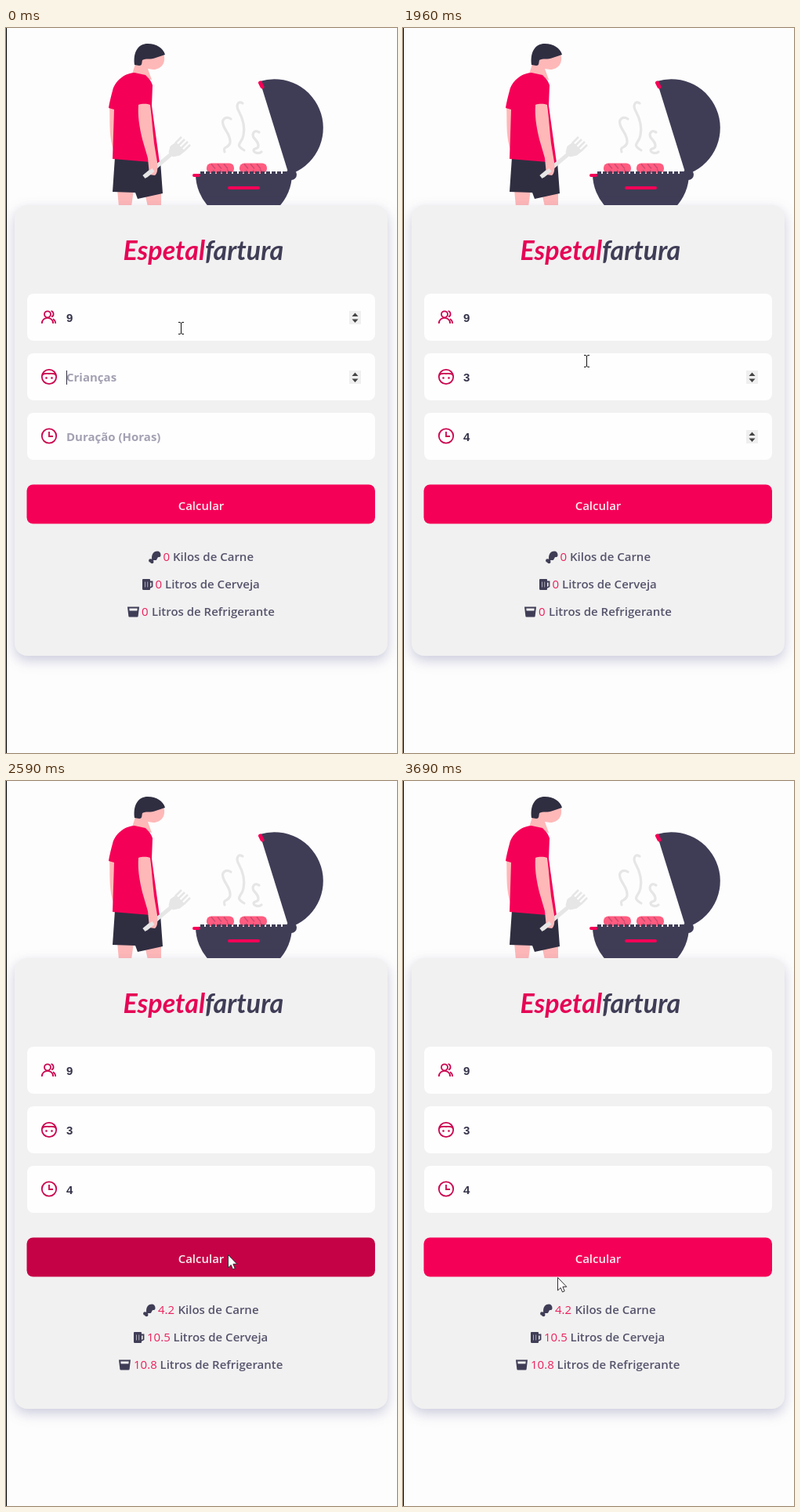
Animation, 499 px wide and 925 px high, one loop 3760 ms. Source, as an HTML page:

```html
<!DOCTYPE html>
<html lang="pt-BR">
<head>
<meta charset="utf-8">
<title>Espetalfartura</title>
<style>
html, body { margin: 0; width: 100%; height: 100%; overflow: hidden; background: #fdfdfd; }
svg { display: block; width: 499px; height: 925px; }
text { font: 600 15px "Open Sans", sans-serif; fill: #56546c; }
.title { font: italic 700 34px Lato, cursive; fill: #3f3d56; }
.title.hot { fill: #e60455; }
.hint { font-weight: 700; fill: #a3a1b2; }
.value { font: 700 15px "Liberation Sans", sans-serif; fill: #35334a; }
.num { font-weight: 500; fill: #ec1f5c; }
.label { fill: #f6eef1; text-anchor: middle; }
.card { fill: #f1f1f1; filter: drop-shadow(0 6px 8px rgba(63, 61, 130, .26)); }
.icon { fill: none; stroke: #cb044f; stroke-width: 1.8; }
.caret { fill: #2f2e41; }
.dark { fill: #2f2e41; }
.slate { fill: #3f3d56; }
.red { fill: #f50057; }
.skin { fill: #ffb8b8; }
.steel { fill: #e6e6e6; stroke: #e6e6e6; }
.smoke { fill: none; stroke: #e6e6e6; stroke-width: 3.2; stroke-linecap: round; }

/* 3760 ms loop, hard switches */
.sw, .btn { animation: 3760ms step-end infinite; }
.kids-hint { animation-name: kids-hint; }
.kids-value { animation-name: kids-value; }
.kids-caret0 { animation-name: kids-caret0; }
.kids-caret1 { animation-name: kids-caret1; }
.time-hint { animation-name: time-hint; }
.time-value { animation-name: time-value; }
.time-caret0 { animation-name: time-caret0; }
.time-caret1 { animation-name: time-caret1; }
.spin1 { animation-name: spin1; }
.spin2 { animation-name: spin2; }
.spin3 { animation-name: spin3; }
.before { animation-name: before; }
.after { animation-name: after; }
.beam { animation-name: beam; }
.arrow { animation-name: arrow; }
.btn { animation-name: btn; }
.cursor { animation: move 3760ms linear infinite; }

@keyframes kids-hint { 0% { opacity: 1 } 10.64%, 100% { opacity: 0 } }
@keyframes kids-value { 0% { opacity: 0 } 10.64%, 100% { opacity: 1 } }
@keyframes kids-caret0 { 0% { opacity: 1 } 1.86%, 100% { opacity: 0 } }
@keyframes kids-caret1 { 0% { opacity: 0 } 10.64% { opacity: 1 } 24.73%, 100% { opacity: 0 } }
@keyframes time-hint { 0% { opacity: 1 } 29.26%, 100% { opacity: 0 } }
@keyframes time-value { 0% { opacity: 0 } 29.26%, 100% { opacity: 1 } }
@keyframes time-caret0 { 0% { opacity: 0 } 24.73% { opacity: 1 } 29.26%, 100% { opacity: 0 } }
@keyframes time-caret1 {
  0% { opacity: 0 } 29.26% { opacity: 1 } 42.82% { opacity: 0 }
  56.12% { opacity: 1 } 59.57%, 100% { opacity: 0 }
}
@keyframes spin1 { 0% { opacity: 1 } 50.53%, 100% { opacity: 0 } }
@keyframes spin2 { 0% { opacity: 1 } 24.73% { opacity: 0 } 50.53% { opacity: 1 } 52.39%, 100% { opacity: 0 } }
@keyframes spin3 { 0% { opacity: 0 } 24.73% { opacity: 1 } 59.57%, 100% { opacity: 0 } }
@keyframes before { 0% { opacity: 1 } 63.3%, 100% { opacity: 0 } }
@keyframes after { 0% { opacity: 0 } 63.3%, 100% { opacity: 1 } }
@keyframes beam { 0% { opacity: 1 } 52.39% { opacity: 0 } 54.25% { opacity: 1 } 56.12%, 100% { opacity: 0 } }
@keyframes arrow { 0% { opacity: 0 } 52.39% { opacity: 1 } 54.25% { opacity: 0 } 56.12%, 100% { opacity: 1 } }
@keyframes btn {
  0% { fill: #f50057 } 57.71% { fill: #dc004e } 59.57% { fill: #ca0147 }
  63.3% { fill: #a3114a } 65.16% { fill: #7f214e } 67.02% { fill: #a5114a }
  68.88% { fill: #c60246 } 76.33% { fill: #d2014b } 78.19% { fill: #e00050 }
  80.05% { fill: #ec0054 } 81.91%, 100% { fill: #f50057 }
}
@keyframes move {
  0%, 46.81% { transform: translate(223px, 383px); animation-timing-function: step-end }
  48.67% { transform: translate(225px, 390px); animation-timing-function: step-end }
  50.53% { transform: translate(234px, 425px); animation-timing-function: steps(3) }
  56.12% { transform: translate(277px, 587px); animation-timing-function: step-end }
  57.71%, 70.74% { transform: translate(283px, 604px); animation-timing-function: steps(3) }
  76.33% { transform: translate(478px, 735px); animation-timing-function: step-end }
  78.19% { transform: translate(489px, 720px); animation-timing-function: steps(3) }
  83.78% { transform: translate(481px, 776px); animation-timing-function: steps(4) }
  90.69% { transform: translate(382px, 806px); animation-timing-function: step-end }
  92.55% { transform: translate(336px, 801px); animation-timing-function: steps(3) }
  98.14%, 100% { transform: translate(197px, 633px) }
}
</style>
</head>
<body>
<svg viewBox="0 0 499 925">
  <defs>
    <g id="spinner">
      <rect x="438" y="361" width="15" height="17" fill="#efefef"/>
      <path d="M441.500 368L445.500 363.500 449.500 368ZM441.500 371.500L445.500 376 449.500 371.500Z" fill="#444"/>
    </g>
    <g id="meat" class="slate">
      <path d="M4 9C4 3 7 0 11 0 14 0 15.500 2 15.500 5 15.500 7 14.500 7.500 13 7.500 11 7.500 11.500 10 9.500 11.500L6 11.500Z"/>
      <path d="M7 9L3.500 12.500" stroke="#3f3d56" stroke-width="3"/>
      <circle cx="2.300" cy="12" r="2.200"/><circle cx="4.300" cy="13.600" r="2.200"/>
    </g>
    <g id="mug">
      <path class="slate" d="M0 1Q0 0 1 0H9Q10 0 10 1V13Q10 14 9 14H1.500Q0 14 0 12.500Z"/>
      <path d="M10 3.500H12.500V9.500L10 11" fill="none" stroke="#3f3d56" stroke-width="1.800"/>
      <path d="M3.500 3.500V10.500M6.700 3.500V10.500" stroke="#a9a8b5"/>
    </g>
    <g id="glass">
      <path class="slate" d="M0 0H15L13.600 12Q13.500 13 12.500 13H2.500Q1.500 13 1.400 12Z"/>
      <path d="M2.300 2H12.700L12.400 5H2.600Z" fill="#f1f1f1"/>
    </g>
    <g id="sausage">
      <rect width="35" height="13" rx="6" fill="#ff5c80"/>
      <path d="M6 1L11 7M14 1L19 7M22 1L27 7M8 9L11 12M17 9L20 12M26 8L29 11" stroke="#c94a70" stroke-width="1.300"/>
    </g>
  </defs>

  <rect width="499" height="925" fill="#fdfdfd"/>

  <!-- cook -->
  <path class="skin" d="M132 101L139 103V160L136 152C131 134 133 116 132 101ZM142 206H163L160 228H144ZM177 210L198 209V228H181Z"/>
  <path class="skin" d="M171 38L201 33C205 44 198 53 188 53L181 52 186 66 160 62 165 46Z"/>
  <path class="dark" d="M164 47C162 30 169 20 181 20 192 20 201 26 203 34L191 38C185 41 178 38 174 41 173 45 174 48 170 48Z"/>
  <path class="dark" d="M139 165L197 170 200 211 168 218 165 210 136 209Z"/>
  <path class="red" d="M164 57C150 58 139 68 136 80 133 91 132 96 131 102L138 104 136 167 196 172 186 99 187 73C185 67 182 64 178 60Z"/>
  <path class="steel" d="M176 190L212 160" stroke-width="5"/>
  <path class="skin" d="M169 98C175 96 181 97 184 98 186 113 187 130 189 147L193 171C194 180 193 186 190 188L183 187 181 166 174 142C170 125 168 112 169 98Z"/>
  <path class="steel" d="M178 189L188 181" stroke-width="5"/>
  <path class="steel" d="M208 159L210 151 217 146 228 157 222 162 213 164Z" stroke="none"/>
  <path class="steel" d="M216 147L224 139M220 150L228 142M224 153L232 145M227 157L235 149" stroke-width="2.600"/>

  <!-- grill -->
  <path class="smoke" d="M287 116C281 112 275 116 277 123 279 131 287 136 286 146 285 154 276 150 279 158M302 96C296 92 293 99 297 106 302 115 305 127 303 137 301 148 291 148 304 156M323 133C316 129 313 136 317 141 323 147 324 153 318 154 312 157 321 162 326 158"/>
  <path class="slate" d="M324 68A62 62 0 0 1 361 187Z"/>
  <path d="M324.500 70L327 75" stroke="#f50057" stroke-width="5" stroke-linecap="round"/>
  <circle class="slate" cx="364" cy="187" r="7"/>
  <use href="#sausage" x="256" y="172.500"/><use href="#sausage" x="298" y="172.500"/>
  <path d="M248 184.500H359" stroke="#3f3d56" stroke-width="3" stroke-dasharray="5 2"/>
  <path class="slate" d="M242 186H365A61.500 61.500 0 0 1 242 186Z"/>
  <path d="M240 188H246M285 204H322" stroke="#f50057" stroke-width="4" stroke-linecap="round"/>

  <!-- card -->
  <rect class="card" x="11" y="226" width="476" height="575" rx="16"/>
  <text class="title hot" x="254" y="296" text-anchor="end">Espetal</text>
  <text class="title" x="254" y="296">fartura</text>
  <g fill="#fefefe">
    <rect x="27" y="339" width="444" height="60" rx="8"/>
    <rect x="27" y="415" width="444" height="60" rx="8"/>
    <rect x="27" y="491" width="444" height="60" rx="8"/>
  </g>

  <g class="icon">
    <path d="M45.800 377C45.800 367.500 60.200 367.500 60.200 377M57.500 361C61.500 362 61.500 367.500 58 368.500M60 371.200Q63.200 373 63.200 377"/>
    <circle cx="53" cy="365.300" r="4"/>
    <circle cx="55" cy="445" r="9.200"/>
    <path d="M46 444C47 440 51 441 55 441 59 441 63 440 64 444"/>
    <circle cx="55" cy="520.500" r="9.200"/>
    <path d="M55 515V521H60"/>
  </g>
  <g fill="#cb044f"><circle cx="51.500" cy="446.500" r="1.300"/><circle cx="58.500" cy="446.500" r="1.300"/></g>

  <text class="value" x="77" y="375">9</text>
  <text class="hint sw kids-hint" x="77" y="451">Crianças</text>
  <text class="value sw kids-value" x="77" y="451">3</text>
  <text class="hint sw time-hint" x="77" y="527">Duração (Horas)</text>
  <text class="value sw time-value" x="77" y="527">4</text>
  <g class="caret">
    <rect class="sw kids-caret0" x="77" y="437" width="1" height="18"/>
    <rect class="sw kids-caret1" x="85" y="437" width="1" height="18"/>
    <rect class="sw time-caret0" x="77" y="513" width="1" height="18"/>
    <rect class="sw time-caret1" x="85" y="513" width="1" height="18"/>
  </g>
  <use class="sw spin1" href="#spinner"/>
  <use class="sw spin2" href="#spinner" y="76"/>
  <use class="sw spin3" href="#spinner" y="152"/>

  <rect class="btn" x="26.500" y="582.500" width="444.500" height="50" rx="8" fill="#f50057"/>
  <text class="label" x="249" y="614.500">Calcular</text>

  <!-- results -->
  <g class="sw before">
    <use href="#meat" x="182" y="667.500"/>
    <text class="num" x="200.500" y="680">0</text><text x="213" y="680">Kilos de Carne</text>
    <use href="#mug" x="174" y="703"/>
    <text class="num" x="190.500" y="715">0</text><text x="203" y="715">Litros de Cerveja</text>
    <use href="#glass" x="155" y="738.500"/>
    <text class="num" x="173" y="750">0</text><text x="186" y="750">Litros de Refrigerante</text>
  </g>
  <g class="sw after">
    <use href="#meat" x="175" y="667.500"/>
    <text class="num" x="194" y="680">4.2</text><text x="219.500" y="680">Kilos de Carne</text>
    <use href="#mug" x="163" y="703"/>
    <text class="num" x="180" y="715">10.5</text><text x="213.500" y="715">Litros de Cerveja</text>
    <use href="#glass" x="144" y="738.500"/>
    <text class="num" x="163" y="750">10.8</text><text x="196.500" y="750">Litros de Refrigerante</text>
  </g>

  <rect width="1" height="925"/>

  <g class="cursor">
    <path class="sw beam" d="M-3 -7.500H-1L0.500 -6.500 2 -7.500H4M0.500 -6.500V6.500M-3 7.500H-1L0.500 6.500 2 7.500H4" fill="none" stroke="#111"/>
    <path class="sw arrow" d="M.5 .5V17L4.200 13.500 6.500 19 9.200 17.800 6.900 12.300H11.800Z" fill="#fff" stroke="#332c33"/>
  </g>
</svg>
</body>
</html>
```
